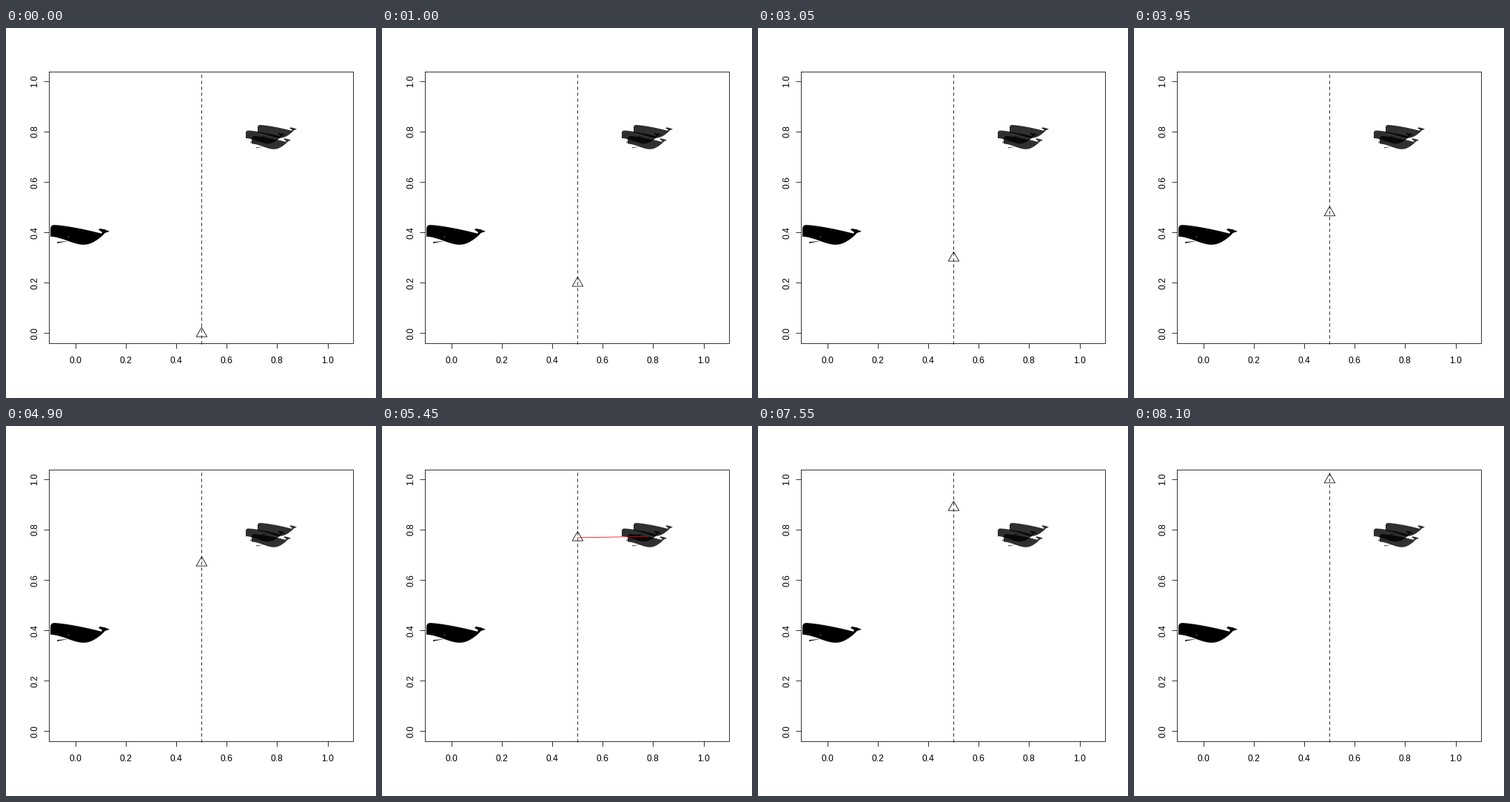
Write a matplotlib script that moves like this. It is 500 px wide and 500 px high and loops after 8.15 s.

```python
import numpy as np
import matplotlib.pyplot as plt
from matplotlib.animation import FuncAnimation
from matplotlib.patches import Polygon

SIZE, DPI = 500, 100
PX = 72 / DPI                 # one pixel in points
STROKE = 0.78                 # line width in pixels
UNIT = 340.3                  # pixels per plot unit
LEFT, RIGHT, TOP, BOTTOM = 58.4, 469.2, 58.6, 426
TICK = 7.2
HOLD = 30                     # frames the ship waits at a sighting
FRAMES, INTERVAL = 163, 50
SIGHTINGS = [(30, (0.02, 0.39)), (77, (0.78, 0.775))]   # step, animal


def px(x):
    return 94.25 + UNIT * x


def py(y):
    return 412.95 - UNIT * y


fig = plt.figure(figsize=(SIZE / DPI, SIZE / DPI), dpi=DPI, facecolor="white")
ax = fig.add_axes([0, 0, 1, 1])
ax.set_xlim(0, SIZE)
ax.set_ylim(SIZE, 0)
ax.axis("off")


def line(xs, ys, color="black", **style):
    return ax.plot(xs, ys, color=color, lw=STROKE * PX, **style)[0]


def label(x, y, value, angle=0):
    ax.text(x, y, f"{value:.1f}", family="Liberation Sans", size=12 * PX,
            rotation=angle, rotation_mode="anchor", ha="center", va="baseline")


def whale_outline():
    """Back and belly as curves, joined by the flukes."""
    t = np.linspace(0, 1, 40)
    x = 69 * t
    back = 12 * t ** 1.5 + 4 * np.exp(-x / 1.5)
    belly = 16 + 11 * np.sin(np.pi * t ** 1.6)
    flukes = [(70, 10), (65, 7), (67, 5.2), (74, 6.6), (80, 9.2), (74, 11)]
    return np.vstack([np.c_[x, back], flukes, np.c_[x, belly][::-1]])


def whale(x, y, scale, alpha):
    jaw = [(9, 23.4), (9, 25), (25, 22)]
    for part in (whale_outline(), jaw):
        points = np.array(part) * scale + (x, y)
        ax.add_patch(Polygon(points, fc="black", ec="none", alpha=alpha))


# Animals
whale(60, 265.8, 1, 1)
ax.plot(83.5, 282, "s", ms=1.2 * PX, color="#b09090", mew=0)
for i in range(3):
    whale((340, 324, 332)[i], 130.8 + 7.5 * i, 0.665, 0.81)

# Box, ticks and labels
line([LEFT, RIGHT, RIGHT, LEFT, LEFT], [TOP, TOP, BOTTOM, BOTTOM, TOP],
     solid_joinstyle="miter")
for v in np.arange(6) / 5:
    x, y = px(v), py(v) - 0.6
    line([x, x], [BOTTOM, BOTTOM + TICK], solid_capstyle="butt")
    line([LEFT - TICK, LEFT], [y, y], solid_capstyle="butt")
    label(x - 0.4, 453.2, v)
    label(42.4, y, v, 90)

# Transect, sight line and ship
line([px(0.5)] * 2, [426.56, 59.04], dashes=(4 / STROKE, 4 / STROKE),
     dash_capstyle="round")
sight = line([], [], color="red")
ship = Polygon([(0, 0)] * 3, closed=True, fill=False, ec="black",
               lw=STROKE * PX, joinstyle="round")
ax.add_patch(ship)


def state(frame):
    """Ship step in hundredths, and the animal in sight, if any."""
    step = frame
    for stop, animal in SIGHTINGS:
        if step <= stop:
            break
        if step <= stop + HOLD:
            return stop, animal
        step -= HOLD + 1
    return step, None


def draw(frame):
    step, animal = state(frame)
    x, y = px(0.5), py(step / 100)
    ship.set_xy([(x, y - 8.4), (x + 7.27, y + 4.2), (x - 7.27, y + 4.2)])
    if animal:
        sight.set_data([x, px(animal[0])], [y, py(animal[1])])
    else:
        sight.set_data([], [])
    return ship, sight


anim = FuncAnimation(fig, draw, frames=FRAMES, interval=INTERVAL,
                     init_func=lambda: draw(0), repeat=True, repeat_delay=0)
plt.show()
```
